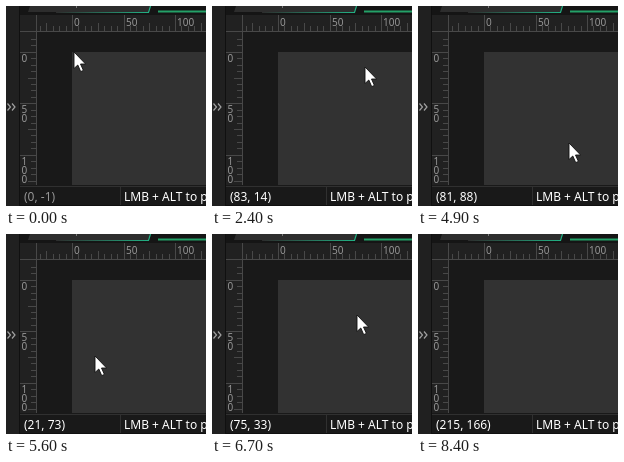
Animation of 200 by 200 pixels, one loop 9.2 s. Source, as an HTML page:

```html
<!DOCTYPE html>
<html lang="en">
<head>
<meta charset="utf-8">
<title>Canvas cursor position</title>
<style>
  html, body { margin: 0; width: 100%; height: 100%; overflow: hidden; background: #191919; }
  svg { display: block; width: 200px; height: 200px; }
  text { font-family: "Noto Sans", sans-serif; white-space: pre; }
  .label { font-size: 10px; fill: #969696; }
  .status { font-size: 12px; fill: #fff; }
  .status.out { fill: #969696; }
  .tick { fill: #484848; }
</style>
</head>
<body>
<svg viewBox="0 0 200 200">
  <defs>
    <linearGradient id="edge" gradientUnits="userSpaceOnUse" x1="50" x2="143">
      <stop stop-color="#2d2d2d"/>
      <stop offset="1" stop-color="#22b184"/>
    </linearGradient>
  </defs>
  <g shape-rendering="crispEdges">
    <rect width="200" height="200" fill="#191919"/>
    <rect width="13" height="200" fill="#202020"/>
    <rect x="13" width="1" height="200" fill="#101010"/>
    <rect x="14" width="186" height="9" fill="#151515"/>
    <rect x="14" y="9" width="186" height="17" fill="#212121"/>
    <rect x="14" y="9" width="17" height="171" fill="#212121"/>
    <rect x="66" y="46" width="134" height="133" fill="#323232"/>
    <rect x="14" y="25" width="186" height="1" class="tick"/>
    <rect x="30" y="9" width="1" height="170" class="tick"/>
  </g>
  <rect x="152" y="4.5" width="48" height="2" fill="#24a168"/>
  <path d="M24 0H144L142 6H22Z" fill="#2d2d2d"/>
  <path d="M50 6.5H142.5L144.5 0" fill="none" stroke="url(#edge)" stroke-width="1.2"/>
  <rect x="70" width="1" height="2" fill="#777"/>
  <path d="M1.5 97.5L4.5 101L1.5 104.5M6 97.5L9 101L6 104.5" fill="none" stroke="#a0a0a0" stroke-width="1.2"/>
  <g id="rulers" shape-rendering="crispEdges"></g>
  <g shape-rendering="crispEdges">
    <rect x="14" y="179" width="186" height="21" fill="#191919"/>
    <rect x="14" y="180" width="186" height="1" fill="#303030"/>
    <rect x="114" y="181" width="1" height="18" fill="#303030"/>
    <rect x="14" y="199" width="186" height="1" fill="#101010"/>
  </g>
  <text id="pos" class="status" x="18" y="195"></text>
  <text class="status" x="118" y="195">LMB + ALT to pan</text>
  <path id="cursor" d="M0 0V16.5L3.8 13L6.7 19.6L9.4 18.4L6.5 12H11.6Z" fill="#fff" stroke="#111" stroke-width=".9"/>
</svg>
<script>
const LOOP = 9200, STEP = 100, ZOOM = 1.03;
const $ = id => document.getElementById(id);

function add(name, attrs, text = "") {
  const el = document.createElementNS("http://www.w3.org/2000/svg", name);
  for (const key in attrs) el.setAttribute(key, attrs[key]);
  el.textContent = text;
  $("rulers").append(el);
}

// Majors every 50 units, each split in halves and eighths.
function drawRulers() {
  for (let i = -5; i <= 20; i++) {
    const v = i * 6.25, major = i % 8 === 0;
    const len = major ? 16 : i % 4 ? 5 : 8;
    const x = Math.round(66 + v * ZOOM), y = Math.round(45.8 + v * ZOOM);
    if (x > 31) add("rect", { x, y: 25 - len, width: 1, height: len, class: "tick" });
    if (y > 26 && y < 179) add("rect", { x: 30 - len, y, width: len, height: 1, class: "tick" });
    if (!major) continue;
    add("text", { x: x + 2, y: 20, class: "label" }, v);
    [...String(v)].forEach((digit, n) =>
      add("text", { x: 15.5, y: y + 10 + n * 9, class: "label" }, digit));
  }
}

const mix = (a, b, t) => a + (b - a) * t;
const ease = (u, power) => (u **= power, u * u * (3 - 2 * u));

// Straight stroke between two points, bowed downwards by an optional arc.
const line = (x0, y0, x1, y1, bow = 0) => s =>
  [mix(x0, x1, s), mix(y0, y1, s) + bow * Math.sin(Math.PI * s)];

// Loop that winds in, runs round a circle and winds in again.
function swirl(s) {
  const angle = mix(43, 380, s) * Math.PI / 180;
  const radius = 34 - 17 * (2 * s - 1) ** 7;
  return [48 + radius * Math.cos(angle), 52.2 + radius * Math.sin(angle)];
}

// The pointer rests between strokes.
const strokes = [
  { from: 0, to: 200, power: 1, path: line(0, -1, 2, -1) },
  { from: 600, to: 2400, power: 1.35, path: line(2, -1, 83, 14, 18) },
  { from: 2900, to: 4400, power: 1.13, path: line(83, 14, 85, 87) },
  { from: 4800, to: 7500, power: 0.84, path: swirl },
  { from: 7800, to: 8400, power: 1, path: line(64, 58, 215, 166) }
];

function draw(now) {
  const ms = Math.floor((now % LOOP) / STEP) * STEP;
  const { from, to, power, path } = strokes.filter(s => s.from <= ms).pop();
  const u = Math.min(1, (ms - from) / (to - from));
  const [x, y] = path(ease(u, power)).map(Math.round);
  $("pos").textContent = `(${x}, ${y})`;
  $("pos").classList.toggle("out", y < 0);
  const left = Math.floor(68 + x * ZOOM), top = Math.floor(47.2 + y * ZOOM);
  $("cursor").setAttribute("transform", `translate(${left} ${top})`);
}

drawRulers();
const start = performance.now();
function tick() {
  draw(performance.now() - start);
  requestAnimationFrame(tick);
}
tick();
</script>
</body>
</html>
```
